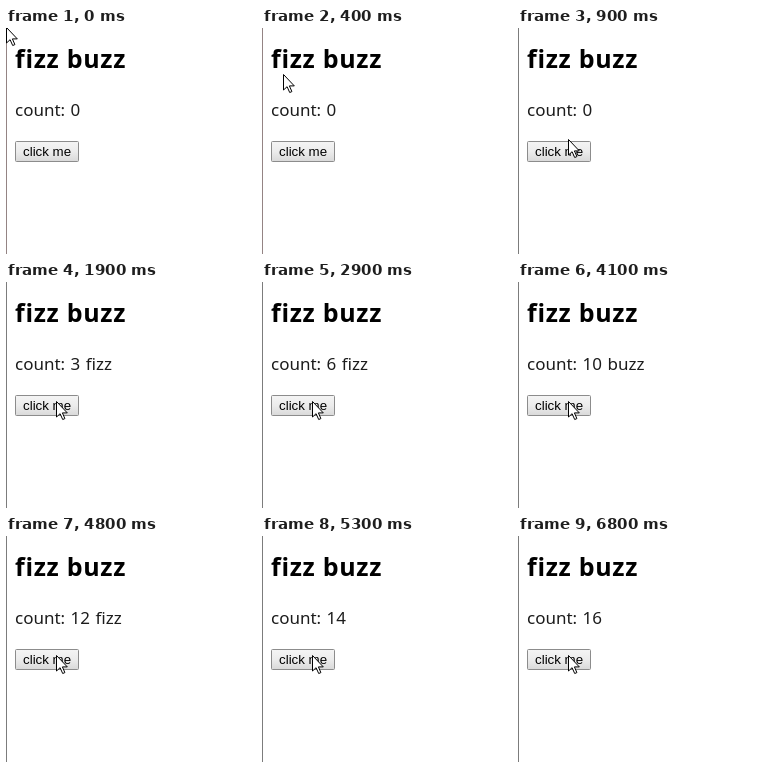
An HTML page with a canvas that plays this animation: 250 by 226 pixels, repeating every 7.1 s.

```html
<!DOCTYPE html>
<html lang="en">
<head>
<meta charset="utf-8">
<title>fizz buzz</title>
<style>
  html, body { margin: 0; width: 100%; height: 100%; overflow: hidden; background: #fff; }
  canvas { display: block; }
</style>
</head>
<body>
<canvas id="stage" width="250" height="226"></canvas>
<script>
const ctx = document.getElementById('stage').getContext('2d');
const LOOP = 7100;
const STEP = 100;
const CLICKS = [1200, 1400, 1500, 2100, 2300, 2500, 3100, 3300, 3500,
                4000, 4300, 4800, 5000, 5200, 5500, 6800];

const progress = (t, from, to) => Math.min(1, Math.max(0, (t - from) / (to - from)));
const smooth = p => p * p * (3 - 2 * p);

function label(n) {
  const words = [];
  if (n && n % 3 === 0) words.push('fizz');
  if (n && n % 5 === 0) words.push('buzz');
  return ['count: ' + n, ...words].join(' ');
}

function text(str, x, baseline, font, { color = '#000', tracking = 0, wordGap = 0 } = {}) {
  ctx.font = font;
  ctx.letterSpacing = tracking + 'px';
  ctx.wordSpacing = wordGap + 'px';
  ctx.fillStyle = color;
  ctx.fillText(str, x, baseline);
}

function drawButton() {
  const face = ctx.createLinearGradient(0, 114, 0, 133);
  face.addColorStop(0, '#f4f4f4');
  face.addColorStop(0.5, '#ececec');
  face.addColorStop(1, '#dadada');
  ctx.beginPath();
  ctx.roundRect(9.5, 113.5, 63, 20, 1);
  ctx.fillStyle = face;
  ctx.fill();
  ctx.strokeStyle = '#8c8c8c';
  ctx.lineWidth = 1;
  ctx.stroke();
  text('click me', 17, 128, '13.33px "Liberation Sans", Arial, sans-serif');
}

function drawCursor(x, y) {
  const points = [[0, 0], [0, 15.5], [3.6, 12.2], [6.2, 18], [8.4, 17.1], [5.9, 11.4], [10.8, 11.4]];
  ctx.beginPath();
  points.forEach(([dx, dy]) => ctx.lineTo(x + dx + 0.5, y + dy + 0.5));
  ctx.closePath();
  ctx.fillStyle = '#fff';
  ctx.fill();
  ctx.strokeStyle = '#000';
  ctx.lineWidth = 1;
  ctx.stroke();
}

function draw(now) {
  const t = Math.floor((now % LOOP) / STEP) * STEP;
  const count = CLICKS.filter(c => c <= t).length;
  const travel = smooth(progress(t, 0, 900));
  const settle = smooth(progress(t, 900, 1200));

  ctx.fillStyle = '#fff';
  ctx.fillRect(0, 0, 250, 226);
  ctx.fillStyle = t < 900 ? '#948484' : '#7c7c7c';
  ctx.fillRect(0, 0, 1, 226);

  text('fizz buzz', 9, 40, 'bold 25px "Noto Sans", "Open Sans", sans-serif', { tracking: 0.7 });
  text(label(count), 9, 88, '17px "Noto Sans", "Open Sans", sans-serif', { color: '#1c1c1c', wordGap: 1 });
  drawButton();
  drawCursor(Math.round(50 * travel), Math.round(112 * travel + 8 * settle) - 1);
}

function tick() {
  draw(performance.now());
  requestAnimationFrame(tick);
}
tick();
</script>
</body>
</html>
```
